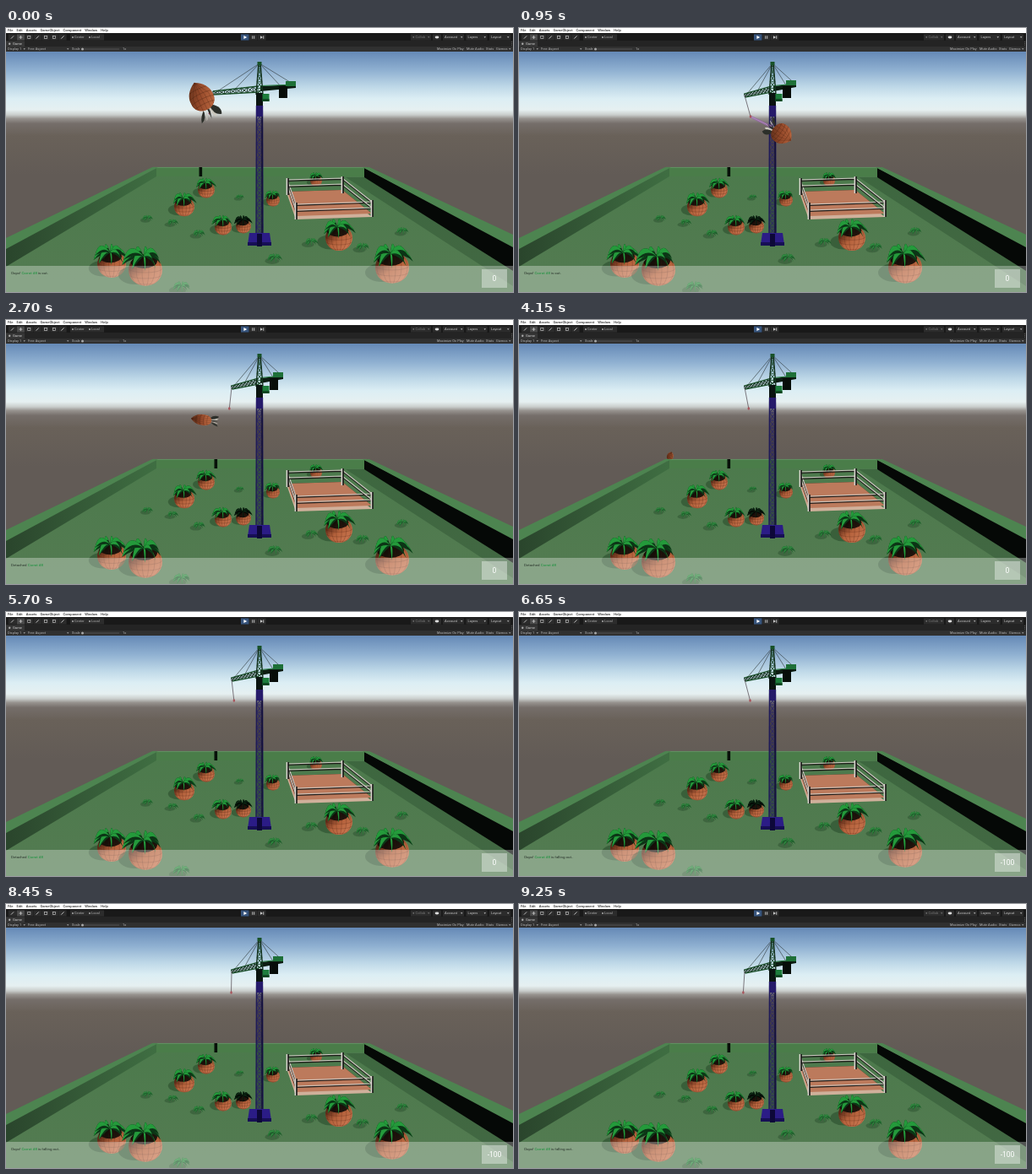
An HTML page with a canvas for the animation above (9.3 s loop, 600 by 313 pixels).

```html
<!DOCTYPE html>
<html lang="en">
<head>
<meta charset="utf-8">
<title>Crane game</title>
<style>
  html, body { margin: 0; width: 100%; height: 100%; overflow: hidden; background: #191919; }
  canvas { display: block; width: 600px; height: 313px; }
</style>
</head>
<body>
<canvas id="stage"></canvas>
<script>
const W = 600, H = 313, LOOP = 9300;
const TURN = Math.PI * 2, RAD = Math.PI / 180;
const density = Math.max(1, window.devicePixelRatio || 1);
const SANS = 'Roboto, "Liberation Sans", sans-serif';

const clamp = v => Math.max(0, Math.min(1, v));
const mix = (a, b, k) => a + (b - a) * k;
const along = (p, q, k) => [mix(p[0], q[0], k), mix(p[1], q[1], k)];
const easeOut = k => Math.sin(k * Math.PI / 2);
const swing = k => (1 - Math.cos(k * Math.PI)) / 2;

function prepare(canvas) {
  canvas.width = W * density;
  canvas.height = H * density;
  const c = canvas.getContext('2d');
  c.scale(density, density);
  return c;
}

function layer(...draws) {
  const canvas = document.createElement('canvas'), c = prepare(canvas);
  draws.forEach(draw => draw(c));
  return canvas;
}

// ---------- drawing helpers ----------
function poly(c, color, ...points) {
  c.fillStyle = color;
  c.beginPath();
  points.forEach(p => c.lineTo(...p));
  c.fill();
}

function line(c, color, width, ...points) {
  c.strokeStyle = color;
  c.lineWidth = width;
  c.beginPath();
  points.forEach(p => c.lineTo(...p));
  c.stroke();
}

function rect(c, color, x, y, w, h) {
  c.fillStyle = color;
  c.fillRect(x, y, w, h);
}

function disc(c, color, x, y, rx, ry = rx) {
  c.fillStyle = color;
  c.beginPath();
  c.ellipse(x, y, rx, ry, 0, 0, TURN);
  c.fill();
}

function text(c, str, x, y, size = 4, color = '#b4b4b4', align = 'left') {
  c.font = `${size}px ${SANS}`;
  c.fillStyle = color;
  c.textAlign = align;
  c.textBaseline = 'middle';
  c.fillText(str, x, y);
  return c.measureText(str).width;
}

function gradient(c, [x0, y0], [x1, y1], stops) {
  const g = c.createLinearGradient(x0, y0, x1, y1);
  Object.entries(stops).forEach(([percent, color]) => g.addColorStop(percent / 100, color));
  return g;
}

// Two rails from p to q, joined by crossed braces; h is the spacing at each end.
function truss(c, p, q, h0, h1, cells, rail, brace) {
  const len = Math.hypot(q[0] - p[0], q[1] - p[1]);
  const nx = (p[1] - q[1]) / len, ny = (q[0] - p[0]) / len;
  const at = (k, side) => {
    const [x, y] = along(p, q, k), h = mix(h0, h1, k) / 2 * side;
    return [x + nx * h, y + ny * h];
  };
  for (let i = 0; i < cells; i++) {
    const a = i / cells, b = (i + 1) / cells;
    line(c, brace, 0.9, at(a, -1), at(b, 1), at(b, -1), at(a, 1));
  }
  for (const side of [-1, 1]) line(c, rail, 1.4, at(0, side), at(1, side));
}

// ---------- plants ----------
function leaves(c, x, y, r, light, dark) {
  const count = 9;
  for (let i = 0; i < count; i++) {
    const a = TURN * (i * 2 % count + 0.4) / count - Math.PI / 2;
    const reach = r * (1.05 + 0.15 * Math.sin(i * 5 + x));
    const ex = x + Math.cos(a) * reach, ey = y + r * (0.35 + 0.4 * Math.sin(a));
    const mx = mix(x, ex, 0.6), my = y + r * (0.25 * Math.sin(a) - 0.6), w = r * 0.24;
    const blade = (color, under) => {
      c.fillStyle = color;
      c.beginPath();
      c.moveTo(x, y);
      c.quadraticCurveTo(mx - w / 2, my - w, ex, ey);
      c.quadraticCurveTo(mx + w / 2, my + w * under, x, y);
      c.fill();
    };
    blade(dark, 2.4);
    blade(light, 1);
  }
}

function planted(c, x, y, r, light = '#249a3b', dark = '#0c3516') {
  disc(c, 'rgba(30,62,34,.45)', x - r * 0.6, y + r * 0.3, r, r * 0.55);
  c.save();
  c.beginPath();
  c.ellipse(x, y, r, r * 0.94, 0, 0, TURN);
  c.clip();
  rect(c, gradient(c, [x - r, y - r], [x + r * 0.5, y + r],
    { 0: '#1c0d07', 35: '#6b341e', 60: '#b5623c', 100: '#cb7852' }), x - r, y - r, r * 2, r * 2);
  disc(c, 'rgba(8,8,5,.85)', x - r * 0.1, y - r * 0.55, r * 0.8, r * 0.45);
  c.strokeStyle = 'rgba(70,30,15,.45)';
  c.lineWidth = 0.5;
  for (let k = 0.2; k < 1; k += 0.35) {
    c.beginPath();
    c.ellipse(x, y, r * k, r, 0, 0, TURN);
    c.stroke();
    c.beginPath();
    c.ellipse(x, y + r * (k - 0.3), r, r * 0.25, 0, 0, Math.PI);
    c.stroke();
  }
  c.restore();
  leaves(c, x - r * 0.1, y - r * 0.8, r * 1.12, light, dark);
}

function sprout(c, x, y) {
  const r = 4.5 + (y - 195) * 0.05;
  disc(c, 'rgba(30,62,34,.35)', x - r * 0.5, y + r * 0.5, r, r * 0.45);
  leaves(c, x, y, r, '#318a40', '#1d5a2a');
}

// ---------- fixed scenery ----------
function drawSky(c) {
  rect(c, gradient(c, [0, 28], [0, 175], {
    0: '#6589b6', 15: '#8fb0d1', 28: '#bdd7e7', 38: '#dceef4', 47: '#e6f0f1',
    51: '#c9cdcb', 54: '#97938f', 58: '#756e6a', 68: '#696159', 100: '#625b56'
  }), 0, 28, W, H);
}

function drawArena(c) {
  poly(c, gradient(c, [0, 170], [0, 300], { 0: '#4c7a4c', 100: '#537b51' }),
    [177, 175], [425, 175], [W, 286], [W, H], [0, H], [0, 280]);
  poly(c, 'rgba(28,62,34,.3)', [425, 177], [W, 288], [W, 306], [402, 177]);
  poly(c, '#4a7d49', [174, 165], [427, 165], [424, 176], [178, 176]);
  line(c, '#69986a', 0.8, [174, 165.4], [427, 165.4]);

  poly(c, gradient(c, [177, 0], [0, 0], { 0: '#3f6e42', 100: '#2a452c' }), [178, 166], [178, 176], [0, 283], [0, 260]);
  poly(c, '#4d8450', [173, 165], [180, 165], [0, 262], [0, 249]);
  poly(c, '#050806', [424, 166], [W, 258], [W, 288], [424, 177]);
  poly(c, '#4d8450', [422, 165], [430, 165], [W, 245], [W, 260]);
}

function drawRing(c) {
  const corners = [[333, 180], [398, 178], [433, 206], [343, 209]];
  const lower = d => corners.map(([x, y]) => [x, y + d]);
  poly(c, '#3c261c', ...lower(14));
  poly(c, '#d0b09b', ...lower(18));
  poly(c, '#bc7a5c', ...lower(14));
  for (const drop of [0, 7]) {
    line(c, '#1b1917', 1.2, ...lower(drop + 1.3), lower(drop + 1.3)[0]);
    line(c, '#cbc7c0', 1.2, ...lower(drop), lower(drop)[0]);
  }
  for (const [x, y] of corners) {
    rect(c, '#151413', x - 0.2, y - 2, 2, 20);
    rect(c, '#d8d4cd', x - 1.4, y - 2, 1.6, 20);
  }
}

function drawPlants(c) {
  [[168, 225], [197, 230], [228, 243], [277, 200], [319, 272], [361, 253], [422, 259], [470, 240], [208, 306]]
    .forEach(p => sprout(c, ...p));
  planted(c, 367, 181, 7);
  drawRing(c);
  planted(c, 281, 235, 9, '#0b2412', '#040805');
  [[237, 192, 10], [316, 204, 8], [211, 212, 12], [257, 236, 10], [394, 249, 16], [125, 280, 17], [457, 284, 20], [165, 287, 20]]
    .forEach(p => planted(c, ...p));
}

function drawTower(c) {
  rect(c, 'rgba(18,16,52,.42)', 296, 92, 8, 152);
  truss(c, [300, 92], [300, 245], 7, 8, 17, '#1f1a58', '#2b2668');
  line(c, '#0e0b30', 1.2, [303, 92], [303, 244]);
  rect(c, '#251a6a', 296, 92, 8, 13);
  poly(c, '#2b1c86', [288, 243], [312, 243], [314, 257], [286, 257]);
  rect(c, '#170f55', 286, 254, 28, 4);
  rect(c, '#0d0838', 297, 244, 6, 15);
}

// ---------- editor chrome ----------
const arrow = (c, x, y, color = '#aaa') => poly(c, color, [x, y - 0.8], [x + 2.5, y - 0.8], [x + 1.2, y + 0.8]);

function drawMenu(c) {
  rect(c, '#fff', 0, 0, W, 6);
  let x = 2;
  for (const word of 'File Edit Assets GameObject Component Window Help'.split(' ')) {
    x += text(c, word, x, 3.1, 4.2, '#000') + 4;
  }
}

function drawToolbar(c) {
  const y = 11, button = (x, w, color = '#2c2c2c') => rect(c, color, x, 7.4, w, 7.2);
  rect(c, '#191919', 0, 6, W, 9);
  for (let i = 0; i < 7; i++) {
    const x = 7.5 + i * 9.9;
    button(x - 4.7, 9.4, i === 1 ? '#4a4a4a' : undefined);
    c.strokeStyle = '#bdbdbd';
    c.lineWidth = 0.7;
    if (i % 3 === 0) line(c, '#bdbdbd', 1, [x - 1.6, y + 1.6], [x + 1.6, y - 1.6]);
    else if (i === 1) [[2, 0], [0, 2]].forEach(([a, b]) => line(c, '#ddd', 0.7, [x - a, y - b], [x + a, y + b]));
    else c.strokeRect(x - 1.6, y - 1.6, 3.2, 3.2);
  }
  button(76, 40);
  ['Center', 'Local'].forEach((word, i) => {
    disc(c, '#aaa', 79 + i * 20, y, 1);
    text(c, word, 81 + i * 20, y);
  });

  for (let i = 0; i < 3; i++) button(278 + i * 10, 9.5, i ? undefined : '#38557d');
  poly(c, '#fff', [281.4, 9], [285.2, y], [281.4, 13]);
  for (const x of [291.3, 293.3, 304.3]) rect(c, '#ccc', x, 9.3, 0.9, 3.5);
  poly(c, '#ccc', [301, 9.2], [304, y], [301, 12.8]);

  const menu = (x, w, word, color = '#c8c8c8') => {
    button(x, w);
    text(c, word, x + 2, y, 4.1, color);
    arrow(c, x + w - 4, y, color);
  };
  menu(479, 24, '● Collab', '#777');
  button(505, 10);
  disc(c, '#ddd', 510, y, 2.4, 1.4);
  ['Account', 'Layers', 'Layout'].forEach((word, i) => menu(517 + i * 27.5, 25, word));
}

function drawGameBar(c) {
  rect(c, '#242424', 0, 15, W, 7);
  rect(c, '#363636', 0, 15.5, 22, 6.5);
  disc(c, '#aaa', 4.2, 18.8, 1.2);
  text(c, 'Game', 8, 18.9, 4.2, '#d0d0d0');
  text(c, '⋮', 596, 18.8, 5);
  rect(c, '#303030', 0, 22, W, 6);
  const labels = { 'Display 1': 2, 'Free Aspect': 26, 'Scale': 78, '1x': 138,
    'Maximize On Play': 510, 'Mute Audio': 545, 'Stats': 568, 'Gizmos': 580 };
  Object.entries(labels).forEach(([word, x]) => text(c, word, x, 25));
  [20.5, 72, 595].forEach(x => arrow(c, x, 25));
  line(c, '#626262', 0.7, [90, 25], [134, 25]);
  disc(c, '#a8a8a8', 90.5, 25, 1.5);
}

// ---------- motion ----------
const RIGHT = 950, RELEASE = 1500, APEX = 2790, SCORED = 6650;
const NEAR_TIP = [245, 77], REST_TIP = [267, 80];

const jibTurn = t => easeOut(clamp(t / RIGHT));
const jibTip = t => along(NEAR_TIP, REST_TIP, jibTurn(t));

// The hook hangs from the jib and sways like a short pendulum.
function hookAt(t) {
  const sway = Math.cos(TURN * (t - RIGHT) / 1125);
  const [x, y] = along([241, 101], [269, 105], jibTurn(t));
  return [x + 5 * sway * jibTurn(t), y];
}

// Carrot on the rope: angle and length around the jib tip, over to the right and back down.
function swinging(t) {
  const out = swing(clamp(t / RIGHT)), back = 1 - Math.cos(clamp((t - RIGHT) / (RELEASE - RIGHT)) * Math.PI / 2);
  const angle = (mix(165, 46, out) + 40 * back) * RAD, rope = mix(15, 64, out) + 10 * back;
  const [x, y] = jibTip(t);
  return {
    x: x + Math.cos(angle) * rope, y: y + Math.sin(angle) * rope,
    heading: mix(244, 35, out) + 70 * back,
    length: mix(36, 26, out), width: mix(29, 24, out) - 7 * back
  };
}

// Carrot thrown away: a parabola, turning steadily and shrinking with distance.
function flying(t) {
  const s = (t - APEX) / 1000, far = clamp((t - RELEASE) / 2650);
  return {
    x: 228 - 36 * s, y: 118 + 23.3 * s * s, heading: 193 + 68 * s,
    length: 27 - 17 * far ** 2.5, width: 17 - 9 * far
  };
}

function drawCarrot(c, { x, y, heading, length, width }) {
  const l = length / 2, w = width / 2;
  c.save();
  c.translate(x, y);
  c.rotate(heading * RAD);
  for (let i = -2; i <= 2; i++) {
    c.fillStyle = i % 2 ? '#cbc8be' : '#2c2f2a';
    c.beginPath();
    c.moveTo(-l * 0.8, i * w * 0.15);
    c.quadraticCurveTo(-l * 1.5, i * w * 0.15, -l * 1.65, i * w * 0.45);
    c.quadraticCurveTo(-l * 1.2, i * w * 0.5 + w * 0.2, -l * 0.8, i * w * 0.15 + w * 0.2);
    c.fill();
  }
  c.beginPath();
  c.moveTo(l, 0);
  for (const side of [-1, 1]) {
    if (side < 0) c.bezierCurveTo(l * 0.7, -w * 0.65, l * 0.35, -w, -l * 0.2, -w);
    else c.bezierCurveTo(-l * 1.25, -w, -l * 1.25, w, -l * 0.2, w);
  }
  c.bezierCurveTo(l * 0.35, w, l * 0.7, w * 0.65, l, 0);
  c.clip();
  // Light comes from the right of the stage whatever the carrot's heading.
  const lit = -heading * RAD, lx = Math.cos(lit) * w, ly = Math.sin(lit) * w;
  rect(c, gradient(c, [-lx, -ly], [lx, ly], { 0: '#6b351d', 45: '#94492a', 100: '#b9653e' }), -l, -w, length, width);
  for (let k = -0.7; k < 1; k += 0.35) {
    c.strokeStyle = 'rgba(50,22,10,.5)';
    c.lineWidth = 0.5;
    c.beginPath();
    c.ellipse(k * l, 0, l * 0.16, w, 0, -Math.PI / 2, Math.PI / 2);
    c.stroke();
    line(c, 'rgba(50,22,10,.4)', 0.5, [-l, k * w], [0, k * w], [l, 0]);
  }
  c.restore();
}

function drawJib(c, t) {
  const turn = jibTurn(t), tip = jibTip(t), apex = [300, 42];
  const back = along([343, 67], [328, 66], turn), weightX = mix(323, 312, turn);
  for (const k of [0.55, 0.95]) {
    line(c, '#2c3436', 0.6, apex, along([300, 70], tip, k));
    line(c, '#2c3436', 0.6, apex, along([300, 68], back, k));
  }
  truss(c, [299, 72.5], tip, 7, 4, 8, '#1c4f2b', '#0d2615');
  poly(c, '#0c1c11', [301, 69], back, [back[0], back[1] + 4], [301, 75]);
  line(c, '#227a3c', 1, [301, 68.5], back);
  rect(c, '#1e7038', back[0] - 12, back[1] - 4, 12, 6);
  rect(c, '#070d09', weightX, 69, 10, 14);

  truss(c, [300, 41], [300, 79], 2, 8, 5, '#12301c', '#1b4a29');
  rect(c, '#185229', 297.5, 40, 5, 4);
  rect(c, '#0a1410', 296, 77, 8, 15);
  rect(c, '#1d7c3c', 303.5, 78, 8, 9);
  rect(c, '#0c4721', 303.5, 84, 8, 3);
}

function drawRope(c, t, carrot) {
  const hook = hookAt(t);
  line(c, '#4d4149', 0.7, jibTip(t), hook);
  if (carrot) {
    const { x, y, heading, length } = carrot;
    const top = [x - Math.cos(heading * RAD) * length * 0.6, y - Math.sin(heading * RAD) * length * 0.6];
    line(c, 'rgba(150,100,170,.7)', 3, hook, top);
    line(c, '#c19acb', 0.7, hook, top);
  }
  disc(c, '#a8555c', ...hook, 1.3, 1.8);
}

function drawPanel(c, t) {
  rect(c, 'rgba(255,255,255,.31)', 0, 282, W, 31);
  rect(c, 'rgba(255,255,255,.38)', 563, 286, 30, 22);
  text(c, t < SCORED ? '0' : '-100', 578, 297.5, 8.5, '#fff', 'center');
  const [before, after] = t < RELEASE ? ['Oops! ', ' is out.'] : t < SCORED ? ['Detached ', ''] : ['Oops! ', ' is falling out..'];
  let x = 6;
  x += text(c, before, x, 291, 4.4, '#263028');
  x += text(c, 'Carrot #8', x, 291, 4.4, '#16913a');
  text(c, after, x, 291, 4.4, '#263028');
}

// ---------- playback ----------
const ctx = prepare(document.getElementById('stage'));
const sky = layer(drawSky), arena = layer(drawArena), props = layer(drawPlants, drawTower);
const editor = layer(drawMenu, drawToolbar, drawGameBar);
const put = image => ctx.drawImage(image, 0, 0, W, H);

function render(t) {
  const attached = t < RELEASE, carrot = attached ? swinging(t) : flying(t);
  put(sky);
  if (t > APEX) drawCarrot(ctx, carrot);
  put(arena);
  rect(ctx, '#071009', mix(228.5, 246.5, jibTurn(t)), 165, 3.6, 11);
  put(props);
  drawJib(ctx, t);
  drawRope(ctx, t, attached && carrot);
  if (t <= APEX) drawCarrot(ctx, carrot);
  drawPanel(ctx, t);
  put(editor);
}

const start = performance.now();
function tick() {
  render((performance.now() - start) % LOOP);
  requestAnimationFrame(tick);
}
tick();
</script>
</body>
</html>
```
